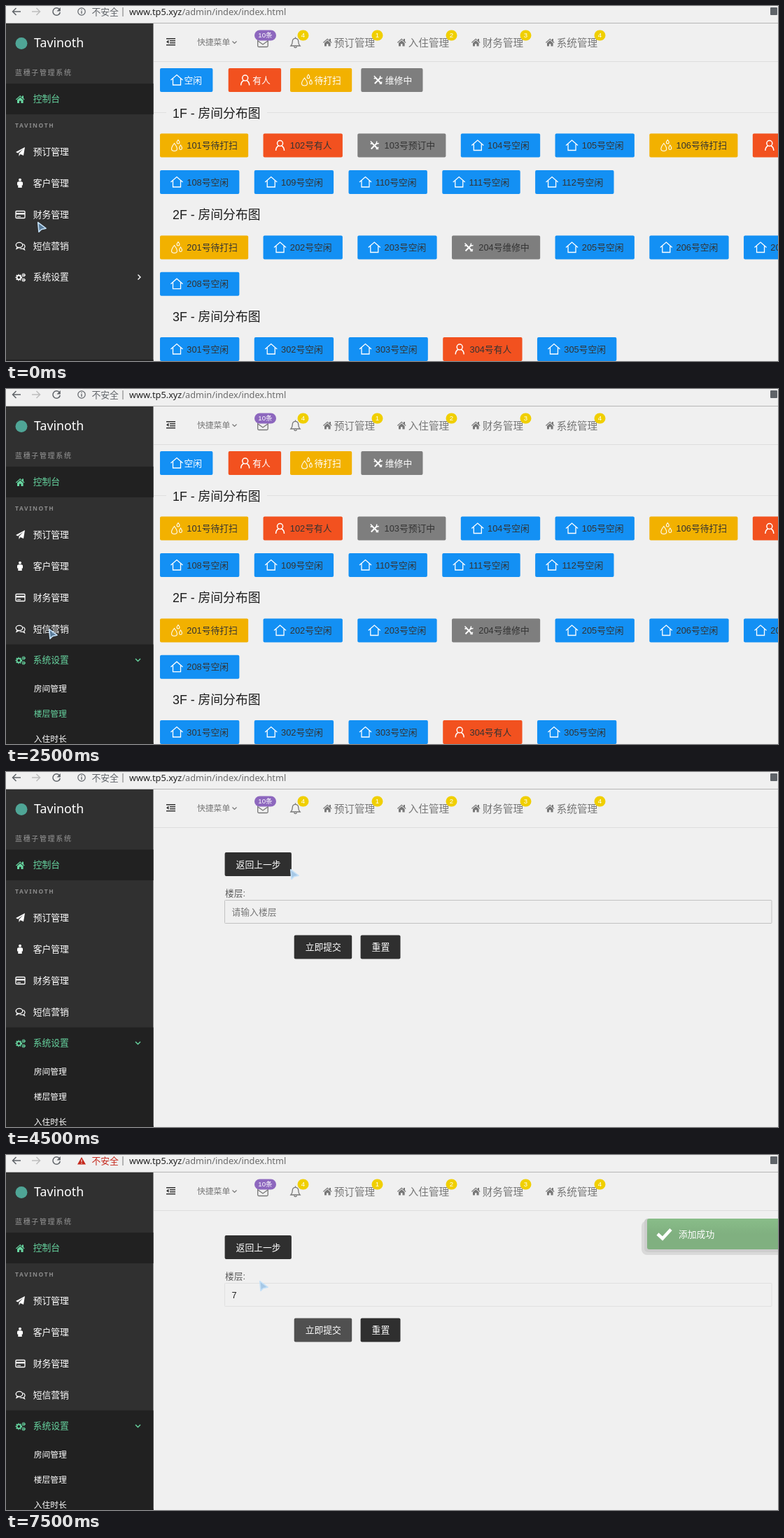
Write an HTML page that moves like this. It is 1103 px wide and 508 px high and loops after 8000 ms.

```html
<!DOCTYPE html>
<html lang="zh-CN">
<head>
<meta charset="utf-8">
<title>客房管理</title>
<style>
  html, body { margin: 0; width: 100%; height: 100%; overflow: hidden; background: #f0f0f0; }
  svg { display: block; width: 1103px; height: 508px; }
  text { font-family: "Liberation Sans", "Noto Sans CJK SC", "Noto Sans CJK JP", "Noto Sans CJK", sans-serif; white-space: pre; }
  .ui { font-family: "Noto Sans", "Noto Sans CJK SC", "Noto Sans CJK", sans-serif; }
</style>
</head>
<body>
<svg id="stage" viewBox="0 0 1103 508"></svg>
<script>
const STEP = 500, STEPS = 16;
const GREEN = '#67d5a0', DARK = '#2f2f2f', GREY = '#777';
const stage = document.getElementById('stage');
const measure = document.createElement('canvas').getContext('2d');
measure.font = '12.8px "Liberation Sans", "Noto Sans CJK SC", "Noto Sans CJK JP", "Noto Sans CJK", sans-serif';

// Pointer tip for every half second
const pointer = [
  [45, 309], [50, 296], [56, 292], [58, 316], [61, 343], [61, 343], [349, 146], [385, 88],
  [440, 114], [406, 139], [388, 143], [388, 143], [388, 143], [370, 168], [362, 180], [362, 180]
];

// y is the optical middle of a line of Chinese text
const text = (x, y, str, size = 12.8, fill = '#fff', attrs = '') =>
  `<text x="${x}" y="${y + size * 0.38}" font-size="${size}" fill="${fill}" ${attrs}>${str}</text>`;
const rect = (x, y, w, h, fill, rx = 0, attrs = '') =>
  `<rect x="${x}" y="${y}" width="${w}" height="${h}" fill="${fill}" rx="${rx}" ${attrs}/>`;
const line = (d, color, width = 1.3, x = 0, y = 0) =>
  `<path transform="translate(${x} ${y})" d="${d}" fill="none" stroke="${color}" stroke-width="${width}"/>`;
const shape = (d, fill, x = 0, y = 0) =>
  `<path transform="translate(${x} ${y})" d="${d}" fill="${fill}" fill-rule="evenodd"/>`;
const ring = (x, y, r, color, width = 1.2, attrs = '') =>
  `<circle cx="${x}" cy="${y}" r="${r}" fill="none" stroke="${color}" stroke-width="${width}" ${attrs}/>`;

const HOME = 'M0 6 6.2.4 9 2.9V1h2v3.7L12.6 6 11.8 7 6.2 2.1.8 7zM2 7 6.2 3.3 10.6 7v4.5H7.5V8.2H5v3.3H2z';

const glyphs = {
  free: line('M0 8.5 8.5 1 17 8.5M3 6.5V15.5H14V6.5', '#fff'),
  busy: ring(8.5, 5.5, 4, '#fff', 1.5) + line('M2.5 16C2.5 12 4.5 10 6.5 9M14.5 16C14.5 12 12.5 10 10.5 9', '#fff', 1.5),
  dirty: line('M5 5.5C-1 13 .5 16.5 5 16.5S11 13 5 5.5ZM10.5.5C7.5 4 8.5 6 10.5 6S13.5 4 10.5.5ZM14 8C11 12 12 14.5 14 14.5S17 12 14 8Z', '#fff', 1.1),
  fix: line('M5 5 14 14M12.5 5 4 13.5', '#fff', 2) +
       line('M3 2.5 5.5 5 3 6.5M12 2.5 11.5 6 15 5.5M11 14 14.5 11', '#fff', 1.5),
  add: ring(9, 8.5, 7, '#fff') + line('M5 8.5H13M9 4.5V12.5', '#fff')
};
const states = {
  f: ['空闲', 'free', '#1390f4'],
  b: ['有人', 'busy', '#f2511f'],
  d: ['待打扫', 'dirty', '#f2b100'],
  m: ['维修中', 'fix', '#7e7e7e'],
  r: ['预订中', 'fix', '#7e7e7e']
};

function button(x, y, label, fill = DARK, icon = '', indent = 16, ink = '#fff') {
  const width = indent + measure.measureText(label).width + 15.3;
  const mark = icon && `<g transform="translate(${x + 15.5} ${y + 8.5})">${glyphs[icon]}</g>`;
  return { width, svg: rect(x, y, width, 34, fill, 2) + mark + text(x + indent, y + 16.9, label, 12.8, ink) };
}
const plainButton = (...args) => button(...args).svg;

function roomRow(y, first, codes) {
  let x = 220, svg = '';
  [...codes].forEach((code, i) => {
    const [label, icon, fill] = states[code];
    const room = button(x, y, `${first + i}号${label}`, fill, icon, 38.3, '#333');
    svg += room.svg;
    x += room.width + 21.4;
  });
  return svg;
}

function roomsPage() {
  const legend = [[220, 'f'], [317.7, 'b'], [406, 'd'], [507.3, 'm']].map(([x, code]) => {
    const [label, icon, fill] = states[code];
    return plainButton(x, 89, label, fill, icon, 34.5);
  }).join('');
  const titles = [153, 298.7, 444.5].map((y, i) =>
    text(238, y, `${i + 1}F - 房间分布图`, 17.8, '#1c1c1c', 'font-weight="300"')).join('');
  return line('M211 152.5H229M373 152.5H1103', '#e0e0e0', 1) + legend + titles +
    roomRow(182.5, 101, 'dbrffdb') + roomRow(235, 108, 'fffff') +
    roomRow(328.5, 201, 'dffmfff') + roomRow(380.7, 208, 'f') + roomRow(474, 301, 'fffbf');
}

function floorsPage(hover) {
  const ink = '#5c5c5c';
  let svg = plainButton(463.5, 97, '添加楼层', hover ? '#505050' : DARK, 'add', 38.5) +
    text(464, 156, 'ID', 12.8, ink) + text(650, 156, '楼层', 12.8, ink) + text(746, 156, '操作', 12.8, ink);
  for (let i = 1; i <= 4; i++) {
    const y = 147.8 + i * 50.2;
    svg += text(464, y, i, 12.8, ink) + text(650, y, i + 'F', 12.8, ink) + plainButton(746, y - 17, '删除');
  }
  return svg;
}

function formPage(step) {
  const typed = step >= 12, done = step >= 15;
  const caretX = step === 10 ? 322.5 : step === 12 ? 330.5 : 0;
  return plainButton(312.6, 115, '返回上一步') + text(313, 173.5, '楼层:', 12.8, '#5c5c5c') +
    rect(312.5, 183.5, 781.5, 33, 'none', 1, `stroke="${done ? '#e0e0e0' : '#c2c2c2'}"`) +
    (typed ? text(322.5, 200, '7', 12.8, '#222') : text(322.5, 200, '请输入楼层', 12.8, '#777')) +
    (caretX ? rect(caretX - 0.5, 192, 1, 15, '#222') : '') +
    plainButton(411.7, 233.5, '立即提交', step >= 14 ? '#505050' : DARK) + plainButton(506.6, 233.5, '重置') +
    (done ? toast() : '');
}

const toast = () => rect(908, 94, 210, 49, '#d9d9d9', 8) + rect(912, 91, 210, 48, '#cdcdcd', 5) +
  `<linearGradient id="toast" x2="0" y2="1"><stop stop-color="#89bd89"/><stop offset=".5" stop-color="#80b080"/></linearGradient>` +
  rect(916, 91, 200, 44, 'url(#toast)', 3) + line('M931 113 938 119.5 950 106.5', '#fff', 4.5) +
  text(961, 113, '添加成功');

function addressBar(warn) {
  const ink = '#5f6368', status = warn ? '#c5281c' : ink;
  const mark = warn
    ? shape('M108 3 114 13.5H102ZM107.4 6.5V10H108.6V6.5ZM107.4 11V12.2H108.6V11Z', status)
    : ring(108, 8, 5.2, ink) + line('M108 7V11M108 4.8V6', ink);
  return line('M21 8H9.5M14.5 3 9.5 8 14.5 13', ink, 1.5) + line('M37 8H48.5M43.5 3 48.5 8 43.5 13', '#bdbdbd', 1.5) +
    line('M76 4.5A5.2 5.2 0 1 0 77.3 9', ink, 1.5) + shape('M77.8 2V7.5H72.5Z', ink) +
    mark + text(122.5, 8.5, '不安全', 12.8, status) + rect(166.5, 2, 1, 13, '#777') +
    `<text class="ui" x="176" y="13" font-size="12.75" fill="#222">www.tp5.xyz<tspan fill="#6b6b6b">/admin/index/index.html</tspan></text>` +
    rect(1092, 2, 10, 11, '#5f6368', 1) + rect(0, 24, 1103, 1, '#b5b5b5');
}

function headerBar() {
  const badge = (x, w, label, fill) => rect(x, 34.5, w, 15, fill, 7.5) +
    text(x + w / 2, 41.8, label, 9.6, '#fff', 'text-anchor="middle"');
  let svg = line('M229 46.8H242M234 49.8H242M234 52.8H242M229 55.8H242', '#333', 1.5) + shape('M229 51.3 232.5 48.5V54Z', '#333') +
    text(273, 52, '快捷菜单', 11.8, GREY) + line('M323.5 50.5 326.5 53.5 329.5 50.5', GREY, 1.2) +
    rect(359.7, 47.2, 14.5, 11.3, 'none', 1.5, `stroke="${GREY}" stroke-width="1.3"`) + line('M360 50 367 55 374 50', GREY) +
    badge(355, 31, '10条', '#8d67be') +
    line('M407 57C409 55 409.3 53 409.3 50.5A4.2 4.2 0 0 1 417.7 50.5C417.7 53 418 55 420 57ZM413.5 44.5V46.5M411.8 58A1.7 1.7 0 0 0 415.2 58', GREY) +
    badge(416.5, 16, '4', '#f0cf00');
  ['预订管理', '入住管理', '财务管理', '系统管理'].forEach((label, i) => {
    const x = 453 + i * 106;
    svg += shape(HOME, GREY, x, 46) + text(x + 15.7, 52, label, 14.6, GREY) + badge(x + 69.5, 16, i + 1, '#f0cf00');
  });
  return svg + rect(211, 79, 892, 1, '#dedede');
}

function sidebar(step) {
  const open = step >= 2, settings = step >= 1 ? GREEN : '#fff';
  const hoverFloor = step >= 4 && step <= 6;
  const cog = (x, y, r, w) => ring(x, y, r, settings, w) + ring(x, y, r + w * 0.8, settings, 1.2, `stroke-dasharray="${r * 0.55}"`);
  let svg = rect(0, 25, 210.5, 483, '#303030') + rect(0, 506, 210.5, 2, '#222') + rect(0, 111, 210.5, 44, '#212121') +
    '<circle cx="22" cy="53.5" r="8.5" fill="#4fa596"/>' +
    '<text class="ui" x="40" y="58.7" font-size="17.8" fill="#fff">Tavinoth</text>' +
    text(13, 95, '蓝穗子管理系统', 10, '#999', 'letter-spacing="1.65"') +
    '<text class="ui" x="13" y="174" font-size="8.5" font-weight="600" letter-spacing="1.6" fill="#8b8b8b">TAVINOTH</text>' +
    shape(HOME, GREEN, 14, 127.5) + text(38.7, 132.5, '控制台', 12.8, GREEN);
  if (open) svg += rect(0, 365.5, 210.5, 143, '#212121');
  ['预订管理', '客户管理', '财务管理', '短信营销', '系统设置'].forEach((label, i) =>
    svg += text(38.7, 208 + i * 44.9, label, 12.8, i === 4 ? settings : '#fff'));
  svg += shape('M27 202 25 214 20.5 212 18.5 215V211L24.5 204.5 17 210.5 14 209Z', '#fff') +
    '<circle cx="20" cy="248.8" r="2" fill="#fff"/>' + shape('M17.5 251.2H22.5L24 252.5V256.5H22.7V260H17.3V256.5H16V252.5Z', '#fff') +
    rect(14, 293.5, 13, 10, 'none', 1, 'stroke="#fff" stroke-width="1.3"') + rect(14, 296, 13, 2.4, '#fff') + line('M16 301.3H21', '#fff', 1) +
    '<ellipse cx="19" cy="342" rx="4.8" ry="3.6" fill="none" stroke="#fff" stroke-width="1.3"/>' +
    line('M16 345 15 347.5 18.5 345.6M24.5 340.5C28 342.5 27.5 345.5 25.5 346.5L26.5 348.7 23.5 347.3C22 347.5 20.5 347.2 19.5 346.7', '#fff', 1.2) +
    cog(18.3, 388.5, 2.8, 1.8) + cog(25.2, 385, 1.3, 1.1) + cog(25.2, 392, 1.3, 1.1) +
    line(open ? 'M185 386 188.5 389.5 192 386' : 'M188.5 384.5 192 388 188.5 391.5', settings, 1.4);
  if (open) ['房间管理', '楼层管理', '入住时长'].forEach((label, i) =>
    svg += text(39.7, 428.3 + i * 36, label, 11.8, i === 1 && hoverFloor ? GREEN : '#fff'));
  return svg;
}

function arrow([x, y]) {
  return `<path transform="translate(${x} ${y})" d="M.7.7 2 14.3 5.5 10.8 12 9.2Z" fill="#75aee0" fill-opacity=".6" stroke="#c4e0f7" stroke-width="1.6" stroke-linejoin="round"/>`;
}

function page(step) {
  if (step < 6) return roomsPage();
  if (step < 8) return floorsPage(step === 7);
  return step === 8 ? '' : formPage(step);
}

let shown = -1;
function frame(now) {
  const step = Math.floor(now / STEP) % STEPS;
  if (step !== shown) {
    shown = step;
    stage.innerHTML = rect(0, 0, 1103, 508, '#f0f0f0') + addressBar(step >= 12) + headerBar() +
      page(step) + sidebar(step) + arrow(pointer[step]);
  }
  requestAnimationFrame(frame);
}
frame(performance.now());
</script>
</body>
</html>
```
